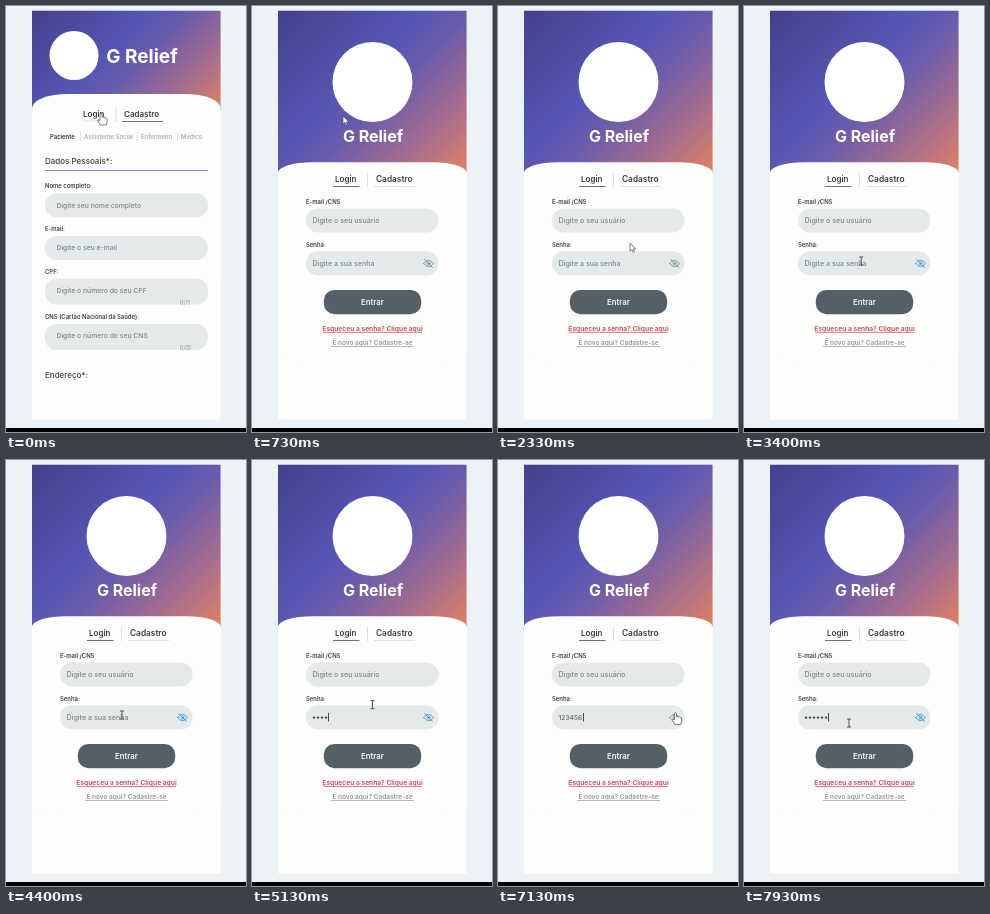
Write an HTML page that moves like this. It is 240 by 426 pixels and loops after 8 s.

```html
<!DOCTYPE html>
<html lang="pt">
<head>
<meta charset="utf-8">
<title>Login</title>
<style>
  html, body { margin: 0; width: 100%; height: 100%; overflow: hidden; background: #ecf2f5; }
  svg { display: block; width: 100%; height: 100%; }
  text { font: 500 6.7px Inter, "Open Sans", sans-serif; fill: #3a4043; }
  .brand { font-weight: 700; fill: #fff; text-anchor: middle; }
  .tab { font-size: 8px; font-weight: 600; }
  .role { font-size: 5.9px; font-weight: 600; fill: #a9afb2; }
  .role.on { fill: #303538; }
  .section { font-size: 8px; }
  .label { font-size: 5.9px; font-weight: 600; }
  .hint { font-size: 6.8px; fill: #7c878b; }
  #login .hint { font-size: 7.1px; }
  .count { font-size: 5.5px; font-weight: 400; fill: #8f999c; }
  .mid { text-anchor: middle; }
  .field { fill: #e4eaea; }
  .rule { stroke: #d2d7da; stroke-width: .8; }
  .under { stroke: #66727a; stroke-width: 1; }
  .under.faint { stroke: #dde1e3; }
  .paper { fill: #fdfdfc; }
  .cursor { fill: #fff; stroke: #555b60; stroke-width: .8; stroke-linejoin: round; }
</style>
</head>
<body>
<svg viewBox="0 0 240 426" preserveAspectRatio="none">
  <defs>
    <linearGradient id="sky" gradientUnits="userSpaceOnUse" x1="32.75" y1="-1.75" x2="207.25" y2="172.75">
      <stop offset="0" stop-color="#42418c"/>
      <stop offset=".42" stop-color="#5656b4"/>
      <stop offset=".56" stop-color="#6a5cac"/>
      <stop offset=".8" stop-color="#a86e8c"/>
      <stop offset="1" stop-color="#e08062"/>
    </linearGradient>
    <linearGradient id="skyLow" href="#sky" x1="48.25" y1="-17.25" x2="191.75" y2="126.25"/>
  </defs>

  <rect width="240" height="426" fill="#ecf2f5"/>
  <rect class="paper" x="26" y="4.7" width="188.6" height="408.8"/>

  <g id="signup">
    <rect x="26" y="4.7" width="188.6" height="99.3" fill="url(#skyLow)"/>
    <rect class="paper" x="26" y="88" width="188.6" height="200" rx="36" ry="14"/>
    <circle cx="68" cy="49.5" r="24.5" fill="#fff"/>
    <text class="brand" x="136" y="56.5" style="font-size:19px">G Relief</text>
    <text class="tab" x="77" y="111">Login</text>
    <text class="tab" x="118" y="111">Cadastro</text>
    <path class="rule" d="M110 101V116"/>
    <path class="under" d="M116 115.5H157"/>
    <path class="under faint" d="M77 115H102"/>
    <g id="roles"></g>
    <text class="section" x="39" y="158">Dados Pessoais*:</text>
    <path d="M39 164.5H202" stroke="#7775cb" stroke-width=".9"/>
    <g id="fields"></g>
    <text class="section" x="39" y="372">Endereço*:</text>
  </g>

  <g id="login">
    <rect x="26" y="4.7" width="188.6" height="162.3" fill="url(#sky)"/>
    <rect class="paper" x="26" y="156.2" width="188.6" height="200" rx="34" ry="10.8"/>
    <circle cx="120.5" cy="76" r="40" fill="#fff"/>
    <text class="brand" x="121" y="136" style="font-size:16px">G Relief</text>
    <text class="tab" x="83" y="176">Login</text>
    <text class="tab" x="124" y="176" style="font-size:8.3px">Cadastro</text>
    <path class="rule" d="M115.5 167V181"/>
    <path class="under" d="M81 180.5H107.5"/>
    <path class="under faint" d="M122 180.5H163"/>
    <text class="label" x="54" y="198">E-mail /CNS</text>
    <rect class="field" x="54" y="202.5" width="132.5" height="24" rx="12"/>
    <text class="hint" x="60.5" y="217">Digite o seu usuário</text>
    <text class="label" x="54" y="240.5">Senha:</text>
    <rect class="field" x="54" y="245.2" width="132.5" height="24.3" rx="12"/>
    <text class="hint" id="empty" x="60.5" y="259.8">Digite a sua senha</text>
    <text id="plain" x="60.5" y="259.8" style="fill:#60686c"></text>
    <g id="dots" fill="#43494c"></g>
    <path id="caret" d="M0 253V261.5" stroke="#333" stroke-width=".9"/>
    <g id="eye" fill="none" stroke-width="1" stroke-linecap="round">
      <path d="M171.7 257.5Q176.5 251 181.3 257.5Q176.5 264 171.7 257.5Z"/>
      <circle cx="176.5" cy="257.5" r="1.4"/>
      <path id="slash" d="M172.8 253.5L180.4 261.4"/>
    </g>
    <rect x="71.8" y="284" width="97.4" height="24.2" rx="10.5" fill="#536067"/>
    <text class="mid" x="120.5" y="298.8" style="font-size:7.8px;font-weight:600;fill:#f4f6f6">Entrar</text>
    <text class="mid" x="120.5" y="325" style="font-weight:600;fill:#c94457">Esqueceu a senha? Clique aqui</text>
    <path d="M71 326.4H170" stroke="#d0596a" stroke-width=".8"/>
    <text class="mid" x="120.5" y="339.3" style="font-weight:600;font-size:6.5px;fill:#92989e">É novo aqui? Cadastre-se</text>
    <path d="M79 340.5H162" stroke="#a0a5ab" stroke-width=".8"/>
  </g>

  <g id="pointer">
    <path id="arrow" class="cursor" d="M0 0V8.2L1.9 6.5L3.2 9.3L4.5 8.7L3.2 6H5.7Z"/>
    <path id="hand" class="cursor" d="M-1 .8Q0-.8 1 .8V4.2Q2.2 3.4 3 4.5Q4.2 3.9 4.8 5Q6.2 4.7 6.2 6.3V8.7L5 12H-.7L-3.3 7.8Q-3.6 6-1 7.5Z"/>
    <path id="beam" fill="none" stroke="#4d5357" stroke-width="1" d="M-2-4H2M0-4V4M-2 4H2"/>
  </g>
  <rect y="422" width="240" height="4" fill="#030303"/>
</svg>
<script>
const $ = id => document.getElementById(id);
const LOOP = 8000, OPEN_LOGIN = 670, FOCUS = 3000;
const TYPE_START = 4650, TYPE_STEP = 150, PASSWORD = "123456";
const REVEAL = 6930, HIDE = 7400;

// time, x, y, pointer shape
const path = [
  [0, 95, 107, "hand"], [400, 95.5, 107.5, "hand"],
  [OPEN_LOGIN, 91, 110, "arrow"], [1000, 91, 110, "arrow"],
  [2150, 132, 237, "arrow"], [2400, 132, 237, "arrow"],
  [2850, 118, 255, "beam"], [4130, 116, 255, "beam"], [4500, 116, 255, "beam"],
  [5450, 122, 241, "arrow"], [5930, 122, 241, "arrow"],
  [6750, 177.5, 252.5, "hand"], [HIDE, 177.5, 252.5, "hand"],
  [7900, 105, 263, "beam"], [LOOP, 105, 263, "beam"]
];

const roles = [["Paciente", 44], ["Assistente Social", 78], ["Enfermeiro", 135], ["Médico", 175]];
$("roles").innerHTML = roles.map(([name, x], i) =>
  `<text class="role ${i ? "" : "on"}" x="${x}" y="132.7">${name}</text>` +
  (i ? `<path class="rule" d="M${x - 3.5} 126V135"/>` : "")).join("");

const fields = [
  ["Nome completo:", "Digite seu nome completo", 187.3, 24],
  ["E-mail:", "Digite o seu e-mail", 230, 24],
  ["CPF:", "Digite o número do seu CPF", 272.5, 26, "0/11"],
  ["CNS (Cartão Nacional da Saúde):", "Digite o número do seu CNS", 318, 26, "0/15"]
];
$("fields").innerHTML = fields.map(([label, hint, y, h, count]) =>
  `<text class="label" x="39" y="${y - 5}">${label}</text>
   <rect class="field" x="39" y="${y}" width="163" height="${h}" rx="12"/>
   <text class="hint" x="50.5" y="${y + 14.3}">${hint}</text>` +
  (count ? `<text class="count" x="174" y="${y + 26.3}">${count}</text>` : "")).join("");

$("dots").innerHTML = [...PASSWORD].map((_, i) =>
  `<circle cx="${62 + i * 4}" cy="257.6" r="1.2"/>`).join("");
const dots = [...$("dots").children];

const show = (node, on) => { node.style.display = on ? "" : "none"; };
const ease = k => k * k * (3 - 2 * k);

function pointerShape(from, to, k) {
  if (from === to) return from;
  if (k > .8) return to;
  return from === "hand" && k > .12 ? "arrow" : from;
}

function movePointer(t) {
  const i = path.findIndex(([time]) => time > t);
  const [t0, x0, y0, from] = path[i - 1], [t1, x1, y1, to] = path[i];
  const k = t1 === OPEN_LOGIN ? 0 : ease((t - t0) / (t1 - t0));
  $("pointer").setAttribute("transform", `translate(${x0 + (x1 - x0) * k} ${y0 + (y1 - y0) * k})`);
  const shape = pointerShape(from, to, k);
  for (const id of ["arrow", "hand", "beam"]) show($(id), id === shape);
}

function draw(t) {
  const onLogin = t >= OPEN_LOGIN;
  show($("signup"), !onLogin);
  show($("login"), onLogin);

  const typed = Math.max(0, Math.min(PASSWORD.length, Math.floor((t - TYPE_START) / TYPE_STEP) + 1));
  const revealed = t >= REVEAL && t < HIDE;
  show($("empty"), !typed);
  $("plain").textContent = revealed ? PASSWORD.slice(0, typed) : "";
  dots.forEach((dot, i) => show(dot, !revealed && i < typed));
  show($("caret"), typed);
  $("caret").setAttribute("transform", `translate(${revealed ? 85.5 : 60.5 + typed * 4} 0)`);
  $("eye").setAttribute("stroke", t >= FOCUS ? "#4f9fdc" : "#8a9498");
  show($("slash"), !revealed);
  movePointer(t);
}

const start = performance.now();
function tick() {
  draw((performance.now() - start) % LOOP);
  requestAnimationFrame(tick);
}
tick();
</script>
</body>
</html>
```
